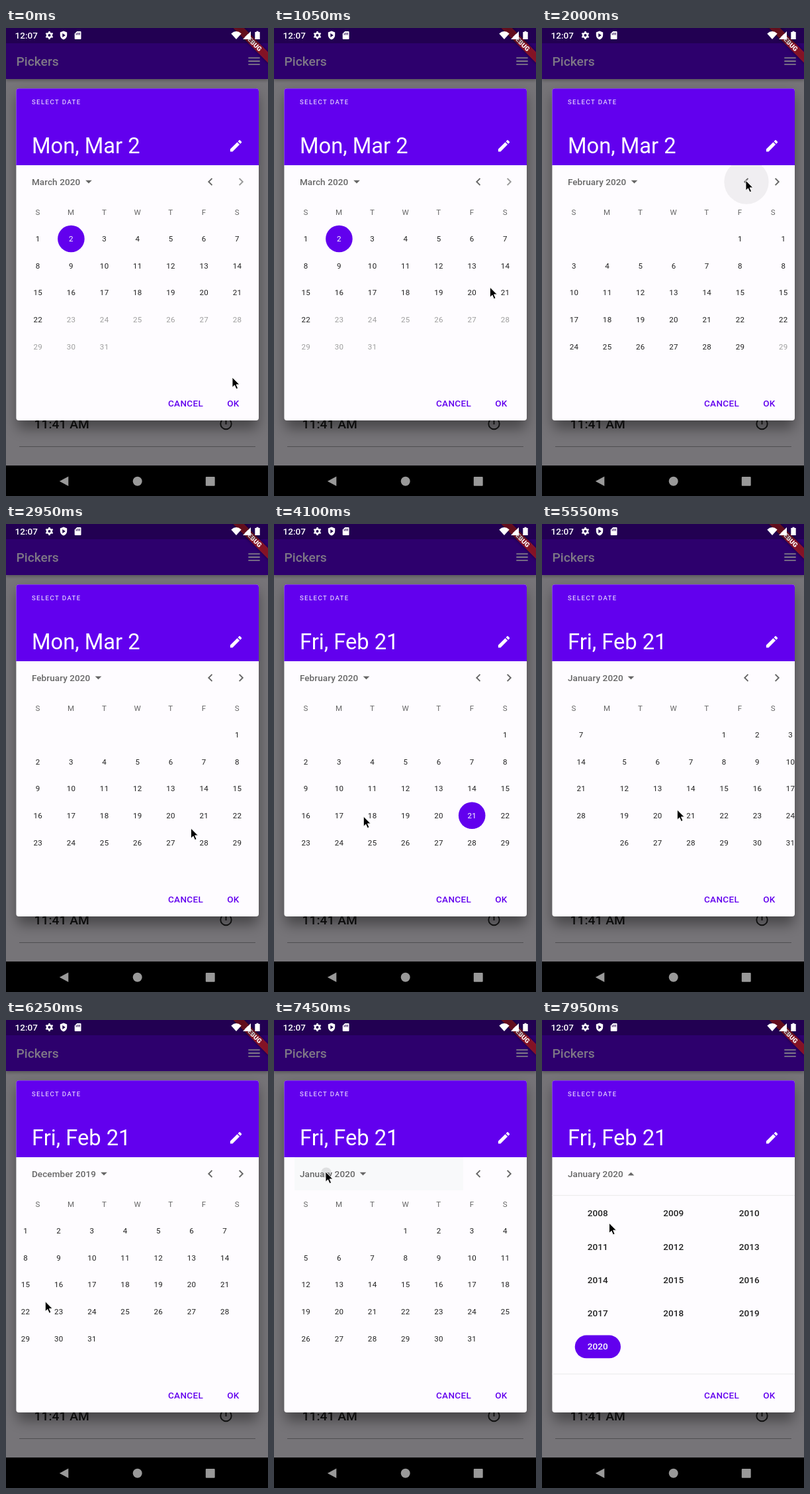
These frames come from a looping animation (396x706 px, 8 s). An HTML page:

```html
<!DOCTYPE html>
<html lang="en">
<head>
<meta charset="utf-8">
<title>Date picker</title>
<style>
  html, body { margin: 0; width: 100%; height: 100%; overflow: hidden; background: #000; }
  svg { display: block; width: 100%; height: 100%; font-family: Roboto, sans-serif; }
  .m { font-weight: 500; }
  .c { text-anchor: middle; }
  .days { font-size: 11.55px; letter-spacing: .3px; }
  .years { font-size: 13.5px; letter-spacing: .1px; }
</style>
</head>
<body>
<svg id="stage" viewBox="0 0 396 706" xmlns="http://www.w3.org/2000/svg">
  <defs>
    <filter id="blur" x="-20%" y="-20%" width="140%" height="140%"><feGaussianBlur stdDeviation="10"/></filter>
    <filter id="soft" x="-20%" y="-80%" width="140%" height="260%"><feGaussianBlur stdDeviation="2"/></filter>
    <clipPath id="sheet"><rect x="15.4" y="207" width="366.6" height="385"/></clipPath>
    <clipPath id="phone"><rect width="396" height="706"/></clipPath>
  </defs>
  <g clip-path="url(#phone)">
    <!-- dimmed app -->
    <rect width="396" height="706" fill="#767478"/>
    <rect y="75" width="396" height="4" opacity=".3" filter="url(#soft)"/>
    <rect width="396" height="77" fill="#2d006d"/>
    <text class="m" x="15.4" y="56.5" font-size="19.25" fill="#7f7886">Pickers</text>
    <path d="M366.3 45.1h17.4M366.3 50h17.4M366.3 54.9h17.4" stroke="#7f7886" stroke-width="1.9"/>
    <path d="M20 631.5H377" stroke="#000" stroke-opacity=".32"/>
    <text class="m" x="42.6" y="604" font-size="19.25" fill="#101010">11:41 AM</text>
    <g fill="none" stroke="#151515" stroke-width="1.9">
      <circle cx="332.5" cy="597" r="8.2"/><path d="M332.5 590v8"/>
    </g>
    <!-- corner banner -->
    <g transform="translate(396 0) rotate(45)">
      <rect x="-38.5" y="25.6" width="77" height="11.6" opacity=".5" filter="url(#soft)"/>
      <rect x="-38.5" y="25.6" width="77" height="11.6" fill="#b71c1c" fill-opacity=".68"/>
      <text class="c" y="34.9" font-size="9.8" font-weight="900" fill="#fff">DEBUG</text>
    </g>
    <!-- status bar -->
    <rect width="396" height="23" opacity=".25"/>
    <g fill="#fff">
      <text class="m" x="13.6" y="16.3" font-size="13.5">12:07</text>
      <g transform="translate(65.5 11)">
        <circle r="3.3" fill="none" stroke="#fff" stroke-width="2.6"/>
        <path id="teeth" stroke="#fff" stroke-width="2.4"/>
      </g>
      <path d="M87 4.6l5.2 2v4.2c0 3.3-2.2 5.8-5.2 6.8-3-1-5.2-3.5-5.2-6.8V6.6z"/>
      <path d="M85.3 8v6l4.6-3z" fill="#22004f"/>
      <path d="M107.3 5h5.2q1 0 1 1v10q0 1-1 1h-7.8q-1 0-1-1V8.6z"/>
      <path d="M106.3 8v2.5M108.7 7v3.5M111.1 7v3.5" stroke="#22004f" stroke-width="1.1"/>
      <path d="M340.3 8.4q7.7-6.6 15.4 0L348 17z"/>
      <path d="M370 5v12h-12z"/>
      <path d="M378.5 4.7h3v1.3h2.2v11h-7.4v-11h2.2z"/>
    </g>
    <!-- dialog -->
    <rect x="17" y="102" width="364" height="502" rx="4" opacity=".4" filter="url(#blur)"/>
    <rect y="660" width="396" height="46"/>
    <g fill="#999"><path d="M94.3 676.5v14.6l-13.5-7.3z"/><circle cx="198.7" cy="683.7" r="7"/><rect x="301.8" y="677" width="13.9" height="13.7" rx="1"/></g>
    <rect x="15.4" y="91.2" width="366.6" height="500.8" rx="4" fill="#fefcff"/>
    <path d="M15.4 207V95.2q0-4 4-4H378q4 0 4 4V207z" fill="#6200ee"/>
    <text x="38.9" y="115" font-size="9.625" letter-spacing="1.44" fill="#fff">SELECT DATE</text>
    <text id="chosen" x="39" y="189.3" font-size="32.7" fill="#fff"/>
    <path transform="translate(336 166.2) scale(.9625)" fill="#fff" d="M3 17.25V21h3.75L17.81 9.94l-3.75-3.75zM20.71 7.04c.39-.39.39-1.02 0-1.41l-2.34-2.34c-.39-.39-1.02-.39-1.41 0l-1.83 1.83 3.75 3.75z"/>
    <g clip-path="url(#sheet)">
      <rect id="hover" x="31" y="207" width="255" height="50" fill="#f8f9fa"/>
      <circle id="splash"/>
      <text id="month" class="m" x="38.9" y="236.8" font-size="13.5" letter-spacing=".1" fill="#666"/>
      <path id="drop" d="M-4.8-2.4h9.6L0 2.4z" fill="#666"/>
      <g id="calendar">
        <path transform="translate(297.3 220.45) scale(.9625)" fill="#666" d="M15.41 7.41L14 6l-6 6 6 6 1.41-1.41L10.83 12z"/>
        <path id="next" transform="translate(343.7 220.45) scale(.9625)" d="M10 6L8.59 7.41 13.17 12l-4.58 4.59L10 18l6-6z"/>
        <g id="names" class="days" fill="#666"/>
        <g id="pages" class="days"/>
      </g>
      <g id="years" class="years m">
        <path d="M15 264.7h368M15 534h368" stroke="#e9e9e9"/>
        <rect x="49.7" y="475.6" width="69.3" height="34.6" rx="17.3" fill="#6200ee"/>
      </g>
    </g>
    <g class="m" font-size="13.5" letter-spacing=".35" fill="#6200ee">
      <text x="244.9" y="571.3">CANCEL</text><text x="334.2" y="571.3">OK</text>
    </g>
    <path id="cursor" d="M0 0v15.2l3.5-3.3 2.5 5.7 2.6-1.1-2.5-5.6h4.8z" stroke="#fff" stroke-width=".9"/>
  </g>
</svg>
<script>
const LOOP = 8000, PAGE = 366.6, COL = 50.2, ROW = 40.6, SLOP = 18;
const $ = id => document.getElementById(id);
const clamp = v => Math.max(0, Math.min(1, v));
const ramp = (t, a, b) => clamp((t - a) / (b - a));
const smooth = p => p * p * (3 - 2 * p);
const show = (el, on) => el.setAttribute('display', on ? 'inline' : 'none');

function add(parent, tag, attrs, text = '') {
  const el = document.createElementNS('http://www.w3.org/2000/svg', tag);
  for (const k in attrs) el.setAttribute(k, attrs[k]);
  el.textContent = text;
  return parent.appendChild(el);
}
const label = (parent, x, y, text, fill = 'inherit') => add(parent, 'text', { x, y, fill, class: 'c' }, text);

// Months in page order, newest first; arrowX is the drop-down centre.
const months = [
  { name: 'March 2020', year: 2020, index: 2, arrowX: 125, last: 22 },
  { name: 'February 2020', year: 2020, index: 1, arrowX: 139.5, last: 31 },
  { name: 'January 2020', year: 2020, index: 0, arrowX: 134.5, last: 31 },
  { name: 'December 2019', year: 2019, index: 11, arrowX: 148, last: 31 }
];

function buildMonth(m) {
  m.page = add($('pages'), 'g', {});
  m.cells = [];
  const first = new Date(m.year, m.index, 1).getDay();
  const count = new Date(m.year, m.index + 1, 0).getDate();
  for (let d = 1; d <= count; d++) {
    const slot = first + d - 1;
    const x = 48.1 + slot % 7 * COL, y = 318 + Math.floor(slot / 7) * ROW;
    const dot = add(m.page, 'circle', { cx: x + .1, cy: y, r: 20.3, fill: '#6200ee', display: 'none' });
    const fill = d > m.last ? '#9e9e9e' : '#212121';
    m.cells[d] = { dot, fill, text: label(m.page, x + .15, y + 4.1, d, fill) };
  }
}

function select(cell, on) {
  show(cell.dot, on);
  cell.text.setAttribute('fill', on ? '#fff' : cell.fill);
}

months.forEach(buildMonth);
[...'SMTWTFS'].forEach((c, i) => label($('names'), 48.1 + i * COL, 281.8, c));
for (let i = 0; i < 13; i++)
  label($('years'), 84.3 + i % 3 * 114.5, 296.2 + Math.floor(i / 3) * 50.3, 2008 + i, i === 12 ? '#fff' : '#212121');
$('teeth').setAttribute('d', Array.from({ length: 6 }, (_, i) => {
  const a = i * Math.PI / 3 + Math.PI / 6, c = Math.cos(a), s = Math.sin(a);
  return `M${c * 3.5} ${s * 3.5}L${c * 6} ${s * 6}`;
}).join(''));

// Pointer stops: time, x, y, and 1 for a steady drag to the stop.
const stops = [
  [0, 342, 527], [650, 342, 527], [1500, 308, 230], [2150, 308, 230],
  [2900, 279.5, 459], [3000, 279.5, 459], [3300, 299, 442], [3650, 299, 442],
  [4200, 120, 441], [4250, 120, 441], [4450, 228, 438, 1], [5000, 228, 438],
  [5370, 110, 434], [5400, 110, 434], [5600, 235, 430, 1], [5800, 235, 430],
  [6180, 96, 425], [6200, 96, 425], [6330, 2.5, 424, 1], [6500, 2.5, 424],
  [7300, 78, 229], [7550, 78, 229], [7900, 101.5, 306.3], [8000, 101.5, 306.3]
];

function pointer(t) {
  const i = Math.max(1, stops.findIndex(s => s[0] >= t));
  const a = stops[i - 1], b = stops[i];
  const p = ramp(t, a[0], b[0]), q = b[3] ? p : smooth(p);
  return [a[1] + (b[1] - a[1]) * q, a[2] + (b[2] - a[2]) * q];
}

// Standard "ease" curve, solved by bisection.
function ease(p) {
  let lo = 0, hi = 1;
  const bez = (u, a, b) => 3 * u * (1 - u) * (1 - u) * a + 3 * u * u * (1 - u) * b + u * u * u;
  for (let i = 0; i < 20; i++) {
    const mid = (lo + hi) / 2;
    if (bez(mid, .25, .25) < p) lo = mid; else hi = mid;
  }
  return bez(lo, .1, 1);
}

// Fraction of a page moved by a drag that is flung on release.
function swipe(t, start, end) {
  if (t <= start) return 0;
  const from = pointer(start)[0];
  const moved = Math.max(0, Math.abs(pointer(Math.min(t, end))[0] - from) - SLOP) / PAGE;
  if (t <= end) return moved;
  const left = (1 - moved) * Math.exp(-.009 * (t - end));
  return left * PAGE < 1 ? 1 : 1 - left;
}

function draw(t) {
  const pos = ease(ramp(t, 1887, 2087)) + swipe(t, 4250, 4450) + swipe(t, 5400, 5600) - swipe(t, 6200, 6330);
  const month = months[Math.round(pos)];
  const picked = t >= 3400, yearMode = t >= 7550;

  $('chosen').textContent = picked ? 'Fri, Feb 21' : 'Mon, Mar 2';
  $('month').textContent = month.name;
  $('drop').setAttribute('transform', `translate(${month.arrowX} 232.2) rotate(${180 * ramp(t, 7550, 7750)})`);
  $('next').setAttribute('fill', month === months[0] ? '#999' : '#666');
  select(months[0].cells[2], !picked);
  select(months[1].cells[21], picked);
  months.forEach((m, i) => {
    const x = (pos - i) * PAGE;
    show(m.page, Math.abs(x) < PAGE);
    m.page.setAttribute('transform', `translate(${x} 0)`);
  });
  show($('calendar'), !yearMode);
  show($('years'), yearMode);

  const onTitle = t > 7000;
  const hold = onTitle ? ramp(t, 7390, 7440) * !yearMode : ramp(t, 1790, 1840) * (1 - ramp(t, 2020, 2250));
  const splash = $('splash');
  splash.setAttribute('cx', onTitle ? 79 : 309);
  splash.setAttribute('cy', onTitle ? 230.5 : 232);
  splash.setAttribute('r', onTitle ? 3 + 5 * ramp(t, 7390, 7450) : 10 + 23.7 * ramp(t, 1790, 1960));
  splash.setAttribute('opacity', hold * (onTitle ? .1 : .055));
  $('hover').setAttribute('opacity', onTitle ? hold : 0);

  $('cursor').setAttribute('transform', `translate(${pointer(t).join(' ')})`);
}

function frame() {
  draw(performance.now() % LOOP);
  requestAnimationFrame(frame);
}
frame();
</script>
</body>
</html>
```
